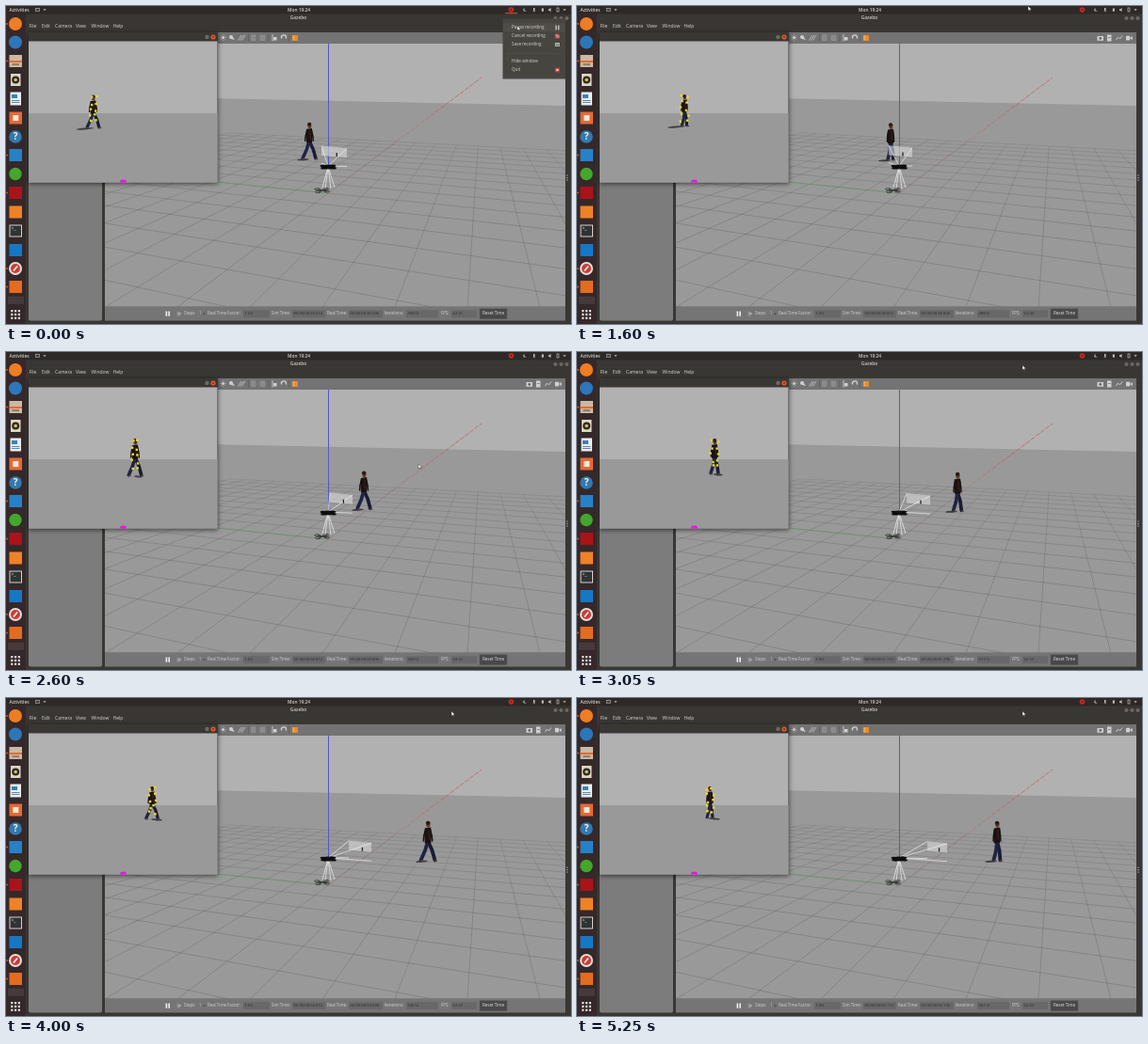
Animation, 600 px wide and 338 px high, one loop 5.3 s. Source, as an HTML page with a canvas:

```html
<!DOCTYPE html>
<html lang="en">
<head>
<meta charset="utf-8">
<title>Drone simulation</title>
<style>
html, body { margin: 0; width: 100%; height: 100%; overflow: hidden; background: #2d2926; }
canvas { display: block; width: 600px; height: 338px; }
</style>
</head>
<body>
<canvas id="c" width="600" height="338"></canvas>
<script>
const g = document.getElementById('c').getContext('2d');
const LOOP = 5300, STEP = 50, TAU = Math.PI * 2;
const FONT = '"Open Sans", "Noto Sans", sans-serif';
const BAR = '#393733';

// time, walker x / foot y, camera-view x / head y / foot y, frustum right / width, camera-view shadow
const TRACK = [
  [0, 322, 163, 92.5, 94.5, 130, 362, 27, -17],
  [900, 310, 161.5, 96, 96, 127, 355, 25, -16],
  [1600, 333, 164, 114, 94, 128, 356, 25, -17],
  [2600, 380, 167.5, 137, 92, 132, 368, 24, 7],
  [3050, 404, 169.5, 146, 92, 130, 375, 25, 8],
  [4000, 448, 173.5, 155, 94, 129, 388, 24, 10],
  [4600, 463, 174.5, 156, 94, 129, 393, 22, 10],
  [4900, 460, 174.5, 150, 94, 128, 394, 21, 10],
  [5250, 446, 173.5, 141, 94, 128, 393, 21, 10]
];
const CURSOR = [
  [0, 543, 21], [550, 543, 21], [850, 479, 0], [2050, 479, 0],
  [2300, 455, 62], [2600, 438, 119], [2750, 438, 119], [3000, 473, 14], [5300, 473, 14]
];

function sample(keys, t) {
  let i = 0;
  while (i < keys.length - 2 && t >= keys[i + 1][0]) i++;
  const a = keys[i], b = keys[i + 1];
  const k = Math.min(1, (t - a[0]) / (b[0] - a[0]));
  return a.slice(1).map((v, n) => v + (b[n + 1] - v) * k);
}

function rnd(n) {
  const v = Math.sin(n * 12.9898) * 43758.5453;
  return v - Math.floor(v);
}

function rect(x, y, w, h, c) { g.fillStyle = c; g.fillRect(x, y, w, h); }

function disc(x, y, r, c) {
  g.fillStyle = c;
  g.beginPath(); g.arc(x, y, r, 0, TAU); g.fill();
}

function oval(x, y, rx, ry, c, a = 0) {
  g.fillStyle = c;
  g.beginPath(); g.ellipse(x, y, rx, ry, a, 0, TAU); g.fill();
}

function path(pts, close) {
  g.beginPath();
  pts.forEach(p => g.lineTo(p[0], p[1]));
  if (close) g.closePath();
}

function poly(pts, c) { path(pts, true); g.fillStyle = c; g.fill(); }

function line(pts, c, w = 1) {
  path(pts);
  g.strokeStyle = c; g.lineWidth = w; g.stroke();
}

function frame(x, y, w, h, c, lw = 0.8) {
  g.strokeStyle = c; g.lineWidth = lw;
  g.strokeRect(x, y, w, h);
}

function text(s, x, y, size, c, align = 'left', weight = 400) {
  g.font = `${weight} ${size}px ${FONT}`;
  g.textAlign = align; g.textBaseline = 'middle';
  g.fillStyle = c;
  g.fillText(s, x, y);
}

function fade(x0, y0, x1, y1, from, to) {
  const f = g.createLinearGradient(x0, y0, x1, y1);
  f.addColorStop(0, from); f.addColorStop(1, to);
  return f;
}

// ground plane to screen
function ground(x, y) {
  const bx = 0.079 * x, cy = 0.028 * y, w = 1 + bx + cy;
  return [(342 + 506 * bx - 886 * cy) / w, (199 + 75 * (bx + cy)) / w];
}

function grid() {
  const c = fade(0, 132, 0, 230, 'rgba(80,80,80,.2)', 'rgba(80,80,80,.36)');
  for (let i = -10; i <= 10; i++) {
    const y0 = Math.max(-10, (0.04 - 1 - 0.079 * i) / 0.028);
    const x0 = Math.max(-10, (0.04 - 1 - 0.028 * i) / 0.079);
    line([ground(i, y0), ground(i, 10)], c, 0.8);
    line([ground(x0, i), ground(10, i)], c, 0.8);
  }
}

function walker(x, top, foot, stride) {
  const h = foot - top, hip = top + h * 0.5, s = 1 + h * 0.15 * stride;
  g.lineCap = 'round'; g.lineJoin = 'round';
  const leg = (d, c) => {
    line([[x, hip], [x + d * 0.5 + 0.8, hip + h * 0.23], [x + d, foot - 1.2]], c, h * 0.09);
    line([[x + d, foot - 0.6], [x + d + 2, foot - 0.3]], '#5c463e', 1.2);
  };
  leg(s, '#191c34');
  leg(-s, '#1f2444');
  const hw = h * 0.075;
  poly([[x - hw, top + h * 0.18], [x + hw, top + h * 0.16], [x + hw + 0.8, top + h * 0.34],
    [x + hw, top + h * 0.55], [x - hw, top + h * 0.55], [x - hw - 0.6, top + h * 0.34]], '#1b1212');
  line([[x + hw * 0.3, top + h * 0.22], [x + hw * 0.5, top + h * 0.46]], '#38201c', 1.2);
  [-1, 1].forEach(d => line([[x + d * hw * 0.8, top + h * 0.22], [x + d * (hw + s * 0.15), top + h * 0.37],
    [x + d * (hw + s * 0.2), top + h * 0.5]], '#181111', 1.4));
  oval(x + 0.4, top + h * 0.085, h * 0.05, h * 0.08, '#63392d');
  oval(x + 0.1, top + h * 0.05, h * 0.052, h * 0.05, '#2a1a16');
  g.lineCap = 'butt'; g.lineJoin = 'miter';
}

function shadow(x, y, dx) {
  oval(x + dx / 2, y, Math.abs(dx) / 2 + 1, 1, 'rgba(25,25,25,.7)', dx < 0 ? -0.08 : 0.08);
}

function drone(R, W) {
  const L = R - W, at = x => 149 + (x - 336) * 0.1;
  // ground shadow
  [[-5, -1.2], [4.5, -1.6], [-4, 1.6], [5, 0.9]].forEach(p => {
    g.strokeStyle = '#303030'; g.lineWidth = 0.8;
    g.beginPath(); g.ellipse(335.5 + p[0], 196 + p[1], 3, 1, 0, 0, TAU); g.stroke();
  });
  line([[331, 194.8], [341, 197]], '#303030', 1);
  line([[332, 197.3], [340.5, 194.6]], '#303030', 1);
  // sonar cone
  [336, 339, 345, 349].forEach((x, i) => line([[342, 171], [x, i % 3 ? 194 : 193]], 'rgba(238,238,238,.85)', 0.9));
  // camera frustum
  poly([[L, at(L)], [R, at(R)], [R, at(R) + 9.5], [L, at(L) + 10]], 'rgba(215,215,215,.62)');
  [[L, 0], [R, 0], [L, 18], [R, 19]].forEach(p => line([[342, 170], [p[0], at(p[0]) + p[1]]], 'rgba(240,240,240,.85)', 0.8));
  line([[L, at(L)], [R, at(R)]], 'rgba(232,232,232,.5)', 0.5);
  const mx = L + W * 0.6;
  line([[mx, at(mx) + 5.5], [mx, at(mx) + 9.5]], '#222', 1.3);
  // body
  const tilt = (R - 355) / 500;
  oval(342, 171, 6.5, 2.4, '#111', tilt);
  [[-5, -1], [5, -1.3], [-4.5, 1.3], [5.5, 1.2]].forEach(p => oval(342 + p[0], 171 + p[1], 3.4, 1.3, '#0c0c0c', tilt));
}

function scene(s, stride) {
  g.save();
  g.beginPath(); g.rect(105, 40, 489, 279.5); g.clip();
  rect(105, 40, 491, 280, '#b1b1b1');
  poly([[105, 95.8], [596, 106], [596, 320], [105, 320]], '#999');
  grid();
  line([ground(0, 0), ground(0, 10)], 'rgba(70,165,70,.4)', 0.8);
  g.setLineDash([5, 1.5]);
  line([[342, 199], [505, 76]], fade(400, 155, 475, 98, 'rgba(190,80,80,.3)', 'rgba(205,70,70,.8)'), 0.8);
  g.setLineDash([]);
  line([[342.5, 40], [342.5, 170]], '#5656c4', 1);
  const [x, foot] = s;
  shadow(x - 1, foot + 0.2, -11);
  walker(x, foot - 39 - (x - 310) * 0.028, foot, stride);
  drone(s[5], s[6]);
  g.restore();
}

function cameraWindow(t, s, stride) {
  const [, , x, top, foot] = s;
  g.save();
  g.shadowColor = 'rgba(0,0,0,.6)'; g.shadowBlur = 5; g.shadowOffsetY = 1;
  rect(24, 28, 201, 159.5, BAR);
  g.restore();
  rect(24, 28, 201, 9.5, BAR);
  disc(213.5, 33, 2.2, '#6b6963');
  disc(220, 33, 2.6, '#e4572c');
  line([[219, 32], [221, 34]], '#4a2a20', 0.6);
  line([[221, 32], [219, 34]], '#4a2a20', 0.6);
  rect(24, 37.5, 200.5, 150, '#b1b1b1');
  rect(24, 114, 200.5, 73.5, '#999');
  shadow(x, foot + 0.4, s[7]);
  walker(x, top, foot, stride);
  const h = foot - top, n = t / STEP;
  for (let i = 0; i < 10; i++) {
    const row = Math.floor(i / 2) / 5, side = i % 2 ? 1 : -1;
    const px = x + side * (1.2 + rnd(n * 17 + i) * 3.4);
    const py = top + 1 + row * (h - 4) + rnd(n * 23 + i + 50) * 4;
    rect(px - 1.2, py - 1.2, 2.4, 2.4, '#f0dc10');
  }
  g.save();
  g.beginPath(); g.rect(24, 38, 201, 149.5); g.clip();
  oval(124.5, 187, 3.4, 2.4, '#f010ea');
  g.restore();
}

function tray() {
  disc(536.5, 4, 2.8, '#c82824');
  disc(536.5, 4, 1, '#7c1512');
  const c = '#bcb8b2';
  disc(551, 4, 1.8, c); disc(552, 3.4, 1.6, '#2d2926');
  rect(560, 2, 1.6, 3, c); rect(559.6, 5.5, 2.6, 0.6, c);
  rect(568.8, 2.5, 2.2, 3.2, c);
  poly([[576, 3.2], [577.2, 3.2], [578.6, 1.8], [578.6, 6.2], [577.2, 5], [576, 5]], c);
  frame(585, 2, 2, 4, c, 0.7);
  poly([[591.5, 3.2], [594.7, 3.2], [593.1, 5.2]], c);
}

function toolbar() {
  rect(105, 28, 489, 12, '#737373');
  const c = '#cfcfcf', dim = '#959595';
  disc(230.5, 33.5, 1.6, c);
  for (let i = 0; i < 8; i++) {
    const a = i * TAU / 8, u = Math.cos(a), v = Math.sin(a);
    line([[230.5 + 2.2 * u, 33.5 + 2.2 * v], [230.5 + 3.4 * u, 33.5 + 3.4 * v]], c, 0.5);
  }
  disc(239, 33, 2, c); poly([[239, 35], [243, 36], [240, 32]], c);
  [0, 2, 4].forEach(d => line([[246.5 + d, 36.5], [250 + d, 31]], c, 0.7));
  [257, 278.5, 300].forEach(x => rect(x, 29.5, 0.7, 8.5, '#5c5c5c'));
  rect(260, 30.5, 5, 6.5, '#888'); frame(261, 31, 4, 5.5, dim, 0.5);
  rect(269.5, 30.5, 5.5, 6.5, '#888'); frame(271, 32, 4, 4.5, dim, 0.5);
  line([[283, 30], [283, 37.5]], c, 0.9);
  rect(284, 33, 3.5, 3.5, c);
  g.strokeStyle = c; g.lineWidth = 1.4;
  g.beginPath(); g.arc(295, 33.4, 2.5, Math.PI * 0.85, Math.PI * 2.15); g.stroke();
  rect(304, 31, 6, 6, '#e88a2c');
  rect(304.5, 31.5, 2, 4.6, '#efa555');
  rect(552.5, 32, 6.5, 4.8, c); disc(555.8, 34.4, 1.4, '#666');
  rect(563, 30.5, 4.5, 7, c); rect(564, 33, 2.5, 0.7, '#666');
  line([[572.5, 36], [574.5, 33], [576.5, 35], [579, 31.5]], c, 0.9);
  rect(583, 31.8, 4.2, 4.6, c); poly([[587.2, 34], [589.8, 32], [589.8, 36.2]], c);
}

function field(label, x, fx, fw, value) {
  text(label, x, 327.2, 4.4, '#d2d2d2');
  rect(fx, 323.2, fw, 8, '#686868');
  text(value, fx + 1.5, 327.2, 4.2, '#2c2c2c');
}

function statusBar(t) {
  rect(105, 319.5, 489, 15, '#757575');
  rect(169.6, 324.5, 1.6, 5.2, '#efefef');
  rect(172.4, 324.5, 1.6, 5.2, '#efefef');
  rect(181.8, 324.8, 0.8, 4.6, '#aaa');
  poly([[183.3, 324.8], [186.4, 327.1], [183.3, 329.4]], '#aaa');
  text('Steps:', 189, 327.2, 4.4, '#d2d2d2');
  text('1', 205, 327.2, 4.4, '#c8c8c8');
  poly([[209, 326.5], [212, 326.5], [210.5, 328.5]], '#4a4a4a');
  const ms = 45612 + t * 2;
  const clock = v => '00 00:00:' + (v / 1000).toFixed(3);
  field('Real Time Factor:', 214, 252, 28, '1.00');
  field('Sim Time:', 282, 304, 35, clock(ms));
  field('Real Time:', 341, 364, 36, clock(ms + 84));
  field('Iterations:', 401.5, 425, 34, String(ms));
  field('FPS:', 462, 473, 27, (62.49 + Math.floor(rnd(Math.floor(t / 400) + 3) * 5) / 100).toFixed(2));
  rect(503, 321.8, 29, 10.7, '#484848');
  frame(503, 321.8, 29, 10.7, '#5a5a5a', 0.6);
  text('Reset Time', 517.5, 327.3, 4.5, '#e2e2e2', 'center');
}

function tile(y, c) { rect(3.5, y - 6.5, 13.5, 13, c); }

function dock() {
  rect(0, 8, 21, 330, '#35282a');
  disc(10, 19, 7, '#ef7d23');
  disc(10, 38.5, 7, '#2d76b9');
  tile(58.5, '#cbb9a2'); rect(3.5, 58, 13.5, 2, '#e56a33'); rect(6.5, 61, 7.5, 2.2, '#8e8071');
  rect(5, 72, 10.5, 13, '#ddd7bd'); disc(10.2, 78.5, 4, '#2b2b2b'); disc(10.2, 78.5, 1.8, '#e2be43');
  rect(4.5, 91.5, 11.5, 14, '#e9eef2'); rect(6, 94, 6, 4, '#3684b5');
  [100, 102].forEach(y => rect(6, y, 8.5, 0.8, '#3c7096'));
  tile(119, '#e46a35'); rect(7.3, 116, 6, 6, '#f6e4da');
  disc(10, 139, 6.8, '#3379ae'); text('?', 10.1, 139.2, 10, '#eef4f8', 'center', 700);
  tile(158.5, '#2681c6');
  disc(10, 178.5, 6.7, '#43a72c');
  tile(198.5, '#a91418');
  tile(219, '#ef8227');
  tile(239, '#d4d2ce'); rect(4.5, 233.5, 11.5, 11, '#2e3434');
  text('>_', 5.5, 237, 5, '#eee');
  tile(259.5, '#1677c5');
  disc(10, 279, 7, '#e3e0dc'); disc(10, 279, 5, '#cf3a34'); line([[8, 281.5], [12, 276.5]], '#eee', 1.7);
  tile(298.5, '#e36c20');
  [309.5, 311.5, 313.5, 315.5].forEach(y => rect(2, y, 17, 0.7, '#655a5c'));
  for (let i = 0; i < 9; i++) rect(5.2 + (i % 3) * 3.8, 323 + Math.floor(i / 3) * 3.8, 2.2, 2.2, '#e4e1dd');
  [19, 58.5, 158.5, 198.5, 279, 298.5].forEach(y => disc(1, y, 0.9, '#e2592c'));
}

function recordMenu(alpha) {
  if (alpha <= 0) return;
  g.save();
  g.globalAlpha = alpha;
  rect(530, 7.2, 13, 1, '#d9562d');
  rect(527.5, 13.5, 66.5, 64, '#474540');
  rect(528, 18.3, 65.5, 9, '#4f4d48');
  [['Pause recording', 23], ['Cancel recording', 32], ['Save recording', 41], ['Hide window', 59], ['Quit', 68]]
    .forEach(([s, y]) => text(s, 537, y, 4.6, '#d8d5cf'));
  rect(531, 50, 59, 0.5, '#57544f');
  rect(583.4, 20.6, 1.6, 4.8, '#b9b6b0'); rect(586, 20.6, 1.6, 4.8, '#b9b6b0');
  disc(585.5, 32, 2.6, '#c95a55'); line([[584, 30.5], [587, 33.5]], '#eee', 0.7);
  rect(583, 39, 5, 4, '#a9b3ab'); rect(584, 40.8, 3, 1.2, '#596b5d');
  rect(583, 65.8, 5, 4.6, '#d23a34'); disc(585.5, 68, 1.2, '#f0d2cf');
  g.restore();
}

function cursor(x, y) {
  const p = [[0, 0], [0, 5], [1.2, 4], [2, 5.6], [2.8, 5.2], [2.1, 3.7], [3.7, 3.6]].map(q => [x + q[0], y + q[1]]);
  poly(p, '#f4f4f4');
  path(p, true);
  g.strokeStyle = '#222'; g.lineWidth = 0.4; g.stroke();
}

function chrome() {
  rect(0, 0, 600, 338, BAR);
  rect(0, 0, 600, 8.5, '#2d2926');
  text('Activities', 3.5, 4.3, 4.8, '#d6d2cc', 'left', 600);
  rect(31, 2, 4.8, 3.8, '#aaa6a0'); rect(31.6, 2.7, 3.6, 2.5, '#423d39');
  poly([[39.5, 3.3], [42.5, 3.3], [41, 5.2]], '#b9b5ae');
  text('Mon 19:24', 311, 4.3, 4.8, '#d6d2cc', 'center', 600);
  text('Gazebo', 310.5, 13.2, 4.9, '#ccc8c1', 'center', 600);
  [['File', 24.5], ['Edit', 38], ['Camera', 52], ['View', 74], ['Window', 90.5], ['Help', 113.5]]
    .forEach(([s, x]) => text(s, x, 21.3, 5, '#d8d5cf'));
  [583.5, 589.5, 595.5].forEach(x => disc(x, 13, 2.1, '#6b6862'));
  tray();
  g.fillStyle = '#7c7c7c';
  g.beginPath(); g.roundRect(24, 28, 78, 306.5, 2); g.fill();
  toolbar();
  [179.5, 182, 184.5].forEach(y => rect(595.3, y, 1.3, 1.2, '#aaa'));
}

function draw(t) {
  const s = sample(TRACK, t);
  const stride = Math.abs(Math.cos(Math.PI * t * 14 / 4000));
  chrome();
  scene(s, stride);
  statusBar(t);
  cameraWindow(t, s, stride);
  dock();
  recordMenu(t < 500 ? 1 : (600 - t) / 150);
  const [cx, cy] = sample(CURSOR, t);
  cursor(cx, cy);
}

const start = performance.now();
function tick(now) {
  const t = Math.max(0, now - start) % LOOP;
  draw(Math.floor(t / STEP) * STEP);
  requestAnimationFrame(tick);
}
draw(0);
requestAnimationFrame(tick);
</script>
</body>
</html>
```
